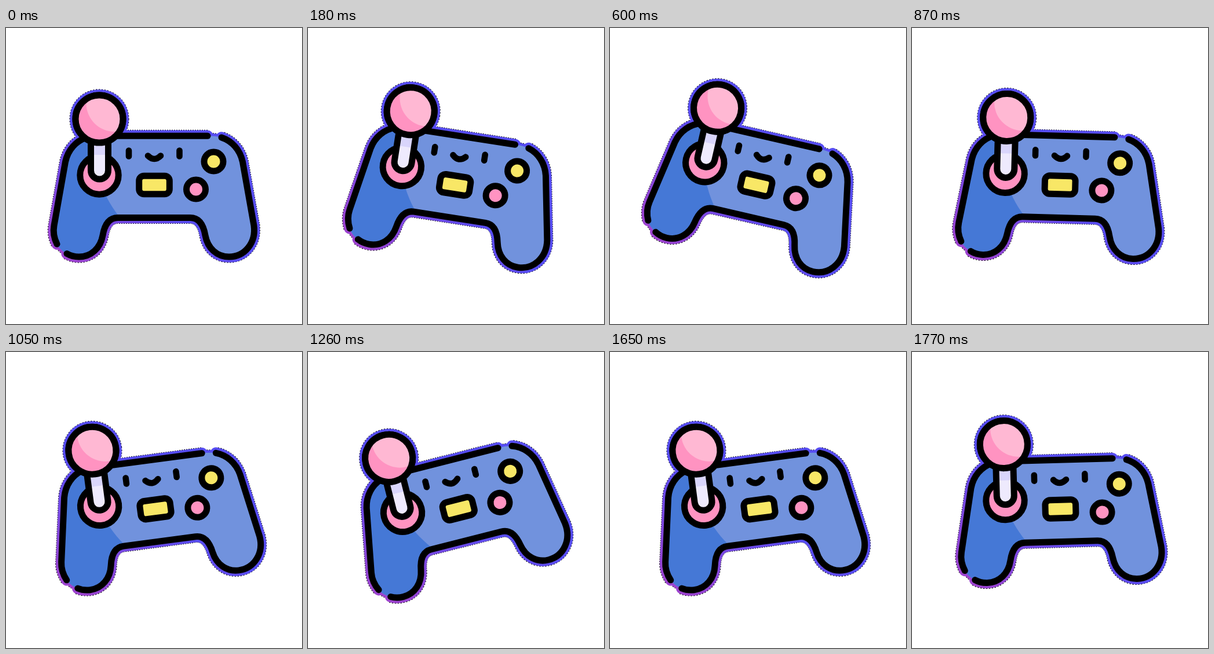
These frames come from a looping animation (511 by 511 pixels, 1800 ms). An HTML page:

```html
<!DOCTYPE html>
<html lang="en">
<head>
<meta charset="utf-8">
<title>Rocking gamepad</title>
<style>
  html, body { margin: 0; width: 100%; height: 100%; overflow: hidden; background: #fff; }
  svg { display: block; width: 100%; height: 100%; }
  .ink { fill: none; stroke: #000; stroke-width: 11; stroke-linecap: round; }
  .pink { fill: #ff93c1; }
  .yellow { fill: #f8e766; }
  .glow { fill: none; stroke: url(#violet); stroke-width: 19.5; stroke-linecap: round; }
  .fringe { fill: none; stroke: #000; stroke-width: 21; stroke-dasharray: 2 2; }
</style>
</head>
<body>
<svg viewBox="0 0 511 511">
  <defs>
    <linearGradient id="violet" gradientUnits="userSpaceOnUse" x1="100" y1="400" x2="220" y2="250">
      <stop stop-color="#9f43ce"/>
      <stop offset="1" stop-color="#574df2"/>
    </linearGradient>
    <path id="body"/>
    <g id="rim">
      <path id="side"/>
      <path id="base"/>
      <path d="M348 186.300H190"/>
      <circle cx="161" cy="157" r="41"/>
    </g>
    <clipPath id="inBody"><use href="#body"/></clipPath>
    <clipPath id="inBall"><circle cx="161" cy="157" r="39"/></clipPath>
  </defs>

  <g id="pad">
    <use href="#rim" class="fringe"/>
    <use href="#body" class="fringe" style="stroke-width:10.5"/>
    <use href="#rim" class="glow"/>
    <use href="#body" class="glow" style="stroke-width:9"/>

    <use href="#body" fill="#7192dd"/>
    <path d="M150 180C150 250 170 295 199 330V400H70V180Z" fill="#4578d6" clip-path="url(#inBody)"/>

    <circle class="ink pink" cx="161" cy="254" r="33.200"/>
    <use href="#rim" class="ink"/>

    <path d="M146.500 190V246a15 15 0 0 0 30 0V190Z" fill="#eeeafd"/>
    <path d="M150 190H173V219H150Z" fill="#d9d5fb"/>
    <path class="ink" d="M146.500 192V246a15 15 0 0 0 30 0V192"/>

    <circle class="pink" cx="161" cy="157" r="41"/>
    <circle cx="187.500" cy="130" r="49" fill="#ffb8d3" clip-path="url(#inBall)"/>
    <circle class="ink" cx="161" cy="157" r="41"/>

    <path class="ink" style="stroke-width:10.6" d="M212 211.500V221.500M299.500 211.500V221.500M245 220.500Q256 231.500 267 220.500"/>
    <rect class="ink yellow" x="229.700" y="255.200" width="52.600" height="31.600" rx="8.500"/>
    <circle class="ink yellow" cx="358.500" cy="230.500" r="16.500"/>
    <circle class="ink pink" cx="328" cy="278.500" r="16.500"/>
  </g>
</svg>
<script>
  const $ = id => document.getElementById(id);

  // Outline in two open strokes; the filled body bridges the gaps.
  const side = 'M139 189C121 195 107 210 102.5 231L83 341C81 352 83 363 88 373';
  const base = '105 389.5C111 393 118 395 126 395C147 395 163 380 167 358' +
    'C170 341 177 327.6 193 327.6H318C334 327.6 341 341 344 358C348 380 364 395 385 395' +
    'C412 395 432 371 428 341L408.5 231C404 210 390 195 372 189';
  $('side').setAttribute('d', side);
  $('base').setAttribute('d', 'M' + base);
  $('body').setAttribute('d', side + 'Q93 383 ' + base + 'Q362 186 348 186.3H190Z');

  const LOOP = 1800, STEP = 30, SWING = 15;
  const start = performance.now();

  function draw(now) {
    const t = Math.max(0, now - start) % LOOP;
    const held = Math.floor(t / STEP) * STEP;
    const angle = SWING * Math.sin(2 * Math.PI * held / LOOP);
    $('pad').setAttribute('transform', `rotate(${angle} 255.5 255.5)`);
    requestAnimationFrame(draw);
  }
  draw(start);
</script>
</body>
</html>
```
